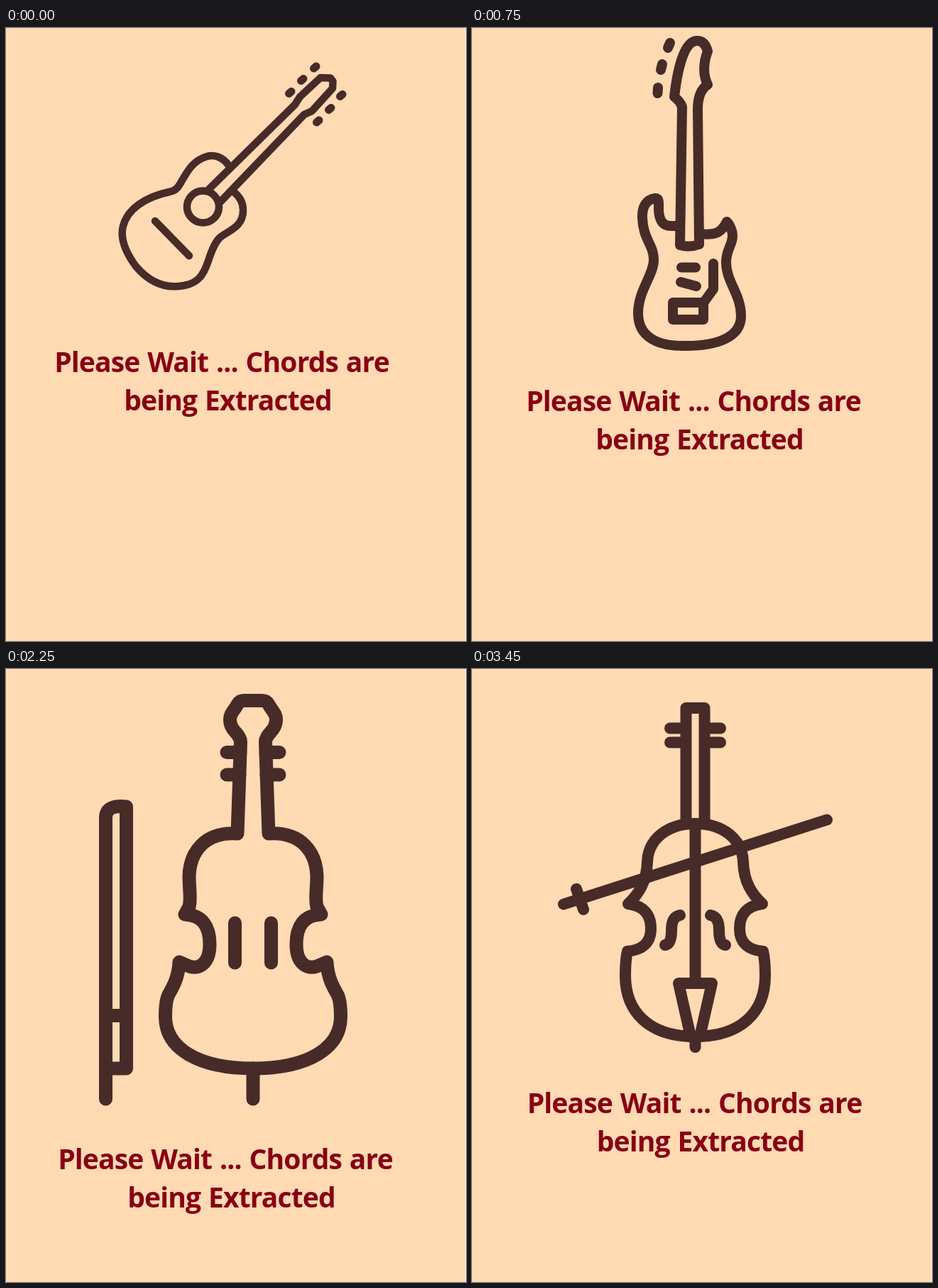
An HTML page for the animation above (3.75 s loop, 648 px wide and 864 px high).

```html
<!DOCTYPE html>
<html lang="en">
<head>
<meta charset="utf-8">
<title>Please wait</title>
<style>
  html, body { margin: 0; width: 100%; height: 100%; overflow: hidden; background: #ffdab3; }
  svg { display: block; width: 648px; height: 864px; }
  .scene {
    fill: none; stroke: #472b29; stroke-linecap: round; stroke-linejoin: round;
    visibility: hidden;
    animation: show 3750ms step-end infinite;
    animation-delay: calc(var(--i) * 750ms - 3750ms);
  }
  @keyframes show {
    0% { visibility: visible; }
    20%, 100% { visibility: hidden; }
  }
  text {
    font: 700 39px "Open Sans", "Noto Sans", sans-serif;
    letter-spacing: -.85px; word-spacing: 1.5px; text-anchor: middle;
    fill: #880015; stroke: none;
  }
</style>
</head>
<body>
<svg viewBox="0 0 648 864">
  <defs>
    <g id="msg">
      <text>Please Wait ... Chords are</text>
      <text x="8.5" y="53.5">being Extracted</text>
    </g>
    <path id="hole" d="M-6.5 6.5 6.5 -6.5"/>
    <circle id="head" r="20.8"/>
  </defs>
  <path d="M647 0h1v864h-1z" fill="#ffeedc"/>

  <!-- acoustic guitar -->
  <g class="scene" style="--i:0" stroke-width="10.5">
    <path d="M314 194C305 181 292 178 283 181C262 187 254 205 245 220C241 227 238 229 230 231
      C197 238 171 255 165 279C160 298 169 317 183 336C201 357 222 366 243 364
      C272 362 279 346 285 328C290 313 295 300 303 294C315 285 334 280 334 257C334 245 329 238 321 231"/>
    <path d="M285 228 407 108 414 97 443 70 457 70.500 460.500 75 460 85 431 117 420 122 302 245"/>
    <circle cx="277.500" cy="252" r="22.500"/>
    <path d="M210 272 258 321"/>
    <path stroke-width="11" d="M398.500 92.500l3.500 -3M415.500 74.500l3.500 -3M433.500 57l3.500 -3
      M437.500 133l3.500 -3M454.500 115.500l3.500 -3M470.500 96.500l3.500 -3"/>
    <use href="#msg" x="304" y="485"/>
  </g>

  <!-- electric guitar -->
  <g class="scene" style="--i:1" stroke-width="14">
    <path d="M296 111Q293 103 285 97C288 70 296 18 317 18C326 18 330 25 332 33C326 48 325 66 332 80
      C322 86 318 97 318 115L320 305Q306 310 293 306Z"/>
    <path d="M279 21l-3 7M268 51l-2 8M262 84l-.5 8"/>
    <path d="M293 279H280C268 279 264 270 263 258C263 245 264 240 258 240C246 241 239 252 240 268
      C241 298 256 305 256 327C256 348 234 370 234 402C234 436 262 449 302 448
      C345 448 379 436 379 406C379 375 358 358 358 330C358 312 367 306 367 293
      C367 285 363 277 359 273C352 287 345 293 320 290"/>
    <path d="M295 337.500H315M294 358 316 364M283 387H326V411H283ZM340 332V368L327 386"/>
    <use href="#msg" x="312" y="540"/>
  </g>

  <!-- pipe and notes -->
  <g class="scene" style="--i:2" stroke-width="13.5">
    <path d="M172 207V103.500H263.500V207M438 344V447"/>
    <use href="#head" x="151.500" y="208"/>
    <use href="#head" x="242.500" y="208"/>
    <use href="#head" x="417.500" y="448"/>
    <path d="M419 153 166 407 203 443 455 190Z"/>
    <path d="M419 153C440 136 449 106 450 78C482 81 515 115 530 157C494 160 472 171 455 190"/>
    <path d="M166 407 160 420C146 432 131 452 128 466C125 480 134 484 146 480C160 474 173 463 187 451L203 443"/>
    <use href="#hole" x="400.500" y="207.500"/>
    <use href="#hole" x="357.500" y="250.500"/>
    <use href="#hole" x="315" y="293"/>
    <use href="#hole" x="272.500" y="336"/>
    <use href="#hole" x="229.500" y="378.500"/>
    <use href="#msg" x="320" y="588"/>
  </g>

  <!-- cello -->
  <g class="scene" style="--i:3" stroke-width="19">
    <path d="M140.500 606V210C140.500 196 152 192 169.500 194V563H140.500M140.500 488.500H169.500"/>
    <g id="cello">
      <path d="M348 44.500H335Q329 44.500 326 50C322 58 315.500 62 315.500 71C315.500 88 330 90 330.500 103
        L326 232C280 229 259 258 258 292C258 310 261 324 258 335L252 346C277 347 287 363 287 388
        C287 415 272 424 258 419L244 413C243 436 234 450 229 459C226 465 224.500 475 224.500 490
        C224.500 533 268 563 348 563"/>
      <path d="M311 117.500H330M311 149H329M322.500 358V414"/>
    </g>
    <use href="#cello" transform="translate(696) scale(-1 1)"/>
    <path d="M348 563V606"/>
    <use href="#msg" x="309" y="705"/>
  </g>

  <!-- violin -->
  <g class="scene" style="--i:4" stroke-width="16">
    <g id="violin">
      <path d="M314.500 55H301.500V214M279 83.500H301M279 103.500H301"/>
      <path d="M314.500 218C275 218 248 240 247 272C246 300 235 317 220 331C243 334 252 347 252 366
        C252 386 240 396 219 398C216 410 216 420 216 432C216 484 250 518 314.500 518"/>
      <path d="M293 347C283 349 281 358 281 368C281 380 279 388 272 389"/>
    </g>
    <use href="#violin" transform="translate(629) scale(-1 1)"/>
    <path d="M314.500 218V443M314.500 518V533M291 443H338L321 518H308Z"/>
    <path d="M129 331.500 500 212.500M147 310 157 339"/>
    <use href="#msg" x="313.500" y="626"/>
  </g>
</svg>
</body>
</html>
```
